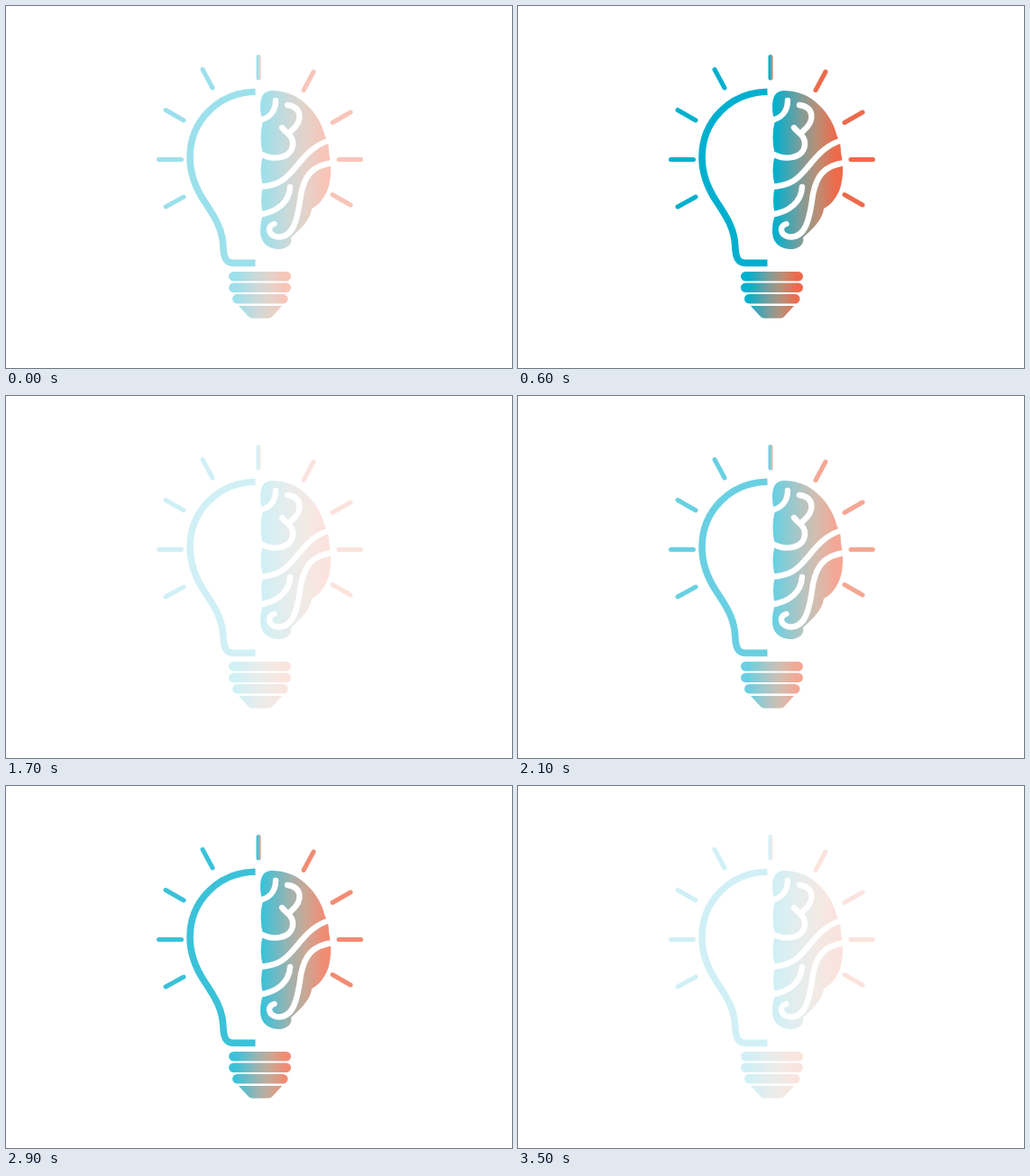
Animation, 561 px wide and 402 px high, one loop 3.7 s. Source, as an HTML page:

```html
<!DOCTYPE html>
<html lang="en">
<head>
<meta charset="utf-8">
<title>Glowing idea bulb</title>
<style>
  html, body { margin: 0; width: 100%; height: 100%; overflow: hidden; background: #fff; }
  svg { display: block; width: 561px; height: 402px; }
  path { stroke-linecap: round; stroke-linejoin: round; }
  .ray { fill: none; stroke-width: 5; }
  .cool { stroke: #00b0ce; }
  .warm { stroke: #ed6a4b; }
  .glass { fill: none; stroke-width: 7.6; stroke-linecap: butt; }
  .fold { fill: none; stroke: #fff; stroke-width: 6.4; }
</style>
</head>
<body>
<svg viewBox="0 0 561 402">
  <defs>
    <linearGradient id="blend">
      <stop stop-color="#00b0ce"/>
      <stop offset=".45" stop-color="#829c98"/>
      <stop offset=".7" stop-color="#b98f76"/>
      <stop offset="1" stop-color="#ed6a4b"/>
    </linearGradient>
    <linearGradient id="brainFill" href="#blend" gradientUnits="userSpaceOnUse" x1="284" x2="352"/>
    <linearGradient id="baseFill" href="#blend" gradientUnits="userSpaceOnUse" x1="255" x2="309"/>
    <linearGradient id="topRay" href="#blend" gradientUnits="userSpaceOnUse" x1="279" x2="283"/>
  </defs>
  <g id="bulb">
    <path class="ray" stroke="url(#topRay)" d="M280 56.5V80"/>
    <path class="ray cool" d="M218 70.5 229 91M177 115.5 197 127M169.5 170.5H194.5M177 223 197 212"/>
    <path class="ray warm" d="M341 73 330 93.5M382 118 362 129.5M369 170.5H393.5M362 209.5 382 221"/>

    <path class="glass cool"
      d="M276.5 95.2C235 96 204 128 204 168C204 186 210 202 220 217C232 235 240 248 240.7 266C241.2 280 244 285.4 253 285.4H276.5"/>

    <path fill="url(#brainFill)"
      d="M282 112C282 100 286 94 295 94C308 94 319 98 328 105C341 115 350 129 353.5 144C357 150 358 155 358 163C361 176 361 190 357 203C353 213 347 221 339 225C338 236 328 247 316 257C318 265 311 270 301 270C289 269 282 262 282 250Q282 240 285 232Q281 216 285 200Q280 183 285 165Q280 146 285 127Q282 122 282 112Z"/>
    <g class="fold">
      <path d="M299 105C299 117 292 125 280 127"/>
      <path d="M312 110C327 112 331 126 316 139M306 135C309 140 319 144 318 154C317 169 296 173 280 163"/>
      <path d="M279 201C304 200 311 191 322 178C334 163 344 153 360 149"/>
      <path d="M315 201C314 217 302 229 279 232"/>
      <path d="M363 174C338 177 331 190 327 209C323 240 318 256 303 256.500C290 256 289 244 297.500 242"/>
    </g>

    <g fill="url(#baseFill)">
      <rect x="247" y="295" width="69" height="10.500" rx="5.250"/>
      <rect x="247" y="307.500" width="69" height="10.500" rx="5.250"/>
      <rect x="251" y="320" width="61.500" height="10.500" rx="5.250"/>
      <path d="M258 333H306L296 344Q294 346.800 291 346.800H273Q270 346.800 268 344Z"/>
    </g>
  </g>
</svg>
<script>
  const STEP = 200, RAMP = 4 * STEP;
  const FIRST_HOLD = 500, SECOND_HOLD = 400;
  const FIRST_LENGTH = 2 * RAMP - STEP + FIRST_HOLD;
  const LOOP = FIRST_LENGTH + 2 * RAMP - STEP + SECOND_HOLD;
  const DIM = 0.18;
  const bulb = document.getElementById("bulb");
  const start = performance.now();

  // Rises in four steps, holds at full strength, then falls in four steps.
  function glow(age, hold) {
    const rise = Math.min(1, Math.floor(age / STEP) * STEP / RAMP);
    const left = 2 * RAMP + hold - age;
    const fall = Math.min(1, (Math.ceil(left / STEP) - 1) * STEP / RAMP);
    return DIM + (1 - DIM) * Math.min(rise, fall ** 1.15);
  }

  function draw() {
    // The loop opens one step into the first pulse.
    const time = (performance.now() - start + STEP) % LOOP;
    const opacity = time < FIRST_LENGTH
      ? glow(time, FIRST_HOLD)
      : glow(time - FIRST_LENGTH, SECOND_HOLD);
    bulb.setAttribute("opacity", opacity);
    requestAnimationFrame(draw);
  }
  draw();
</script>
</body>
</html>
```
